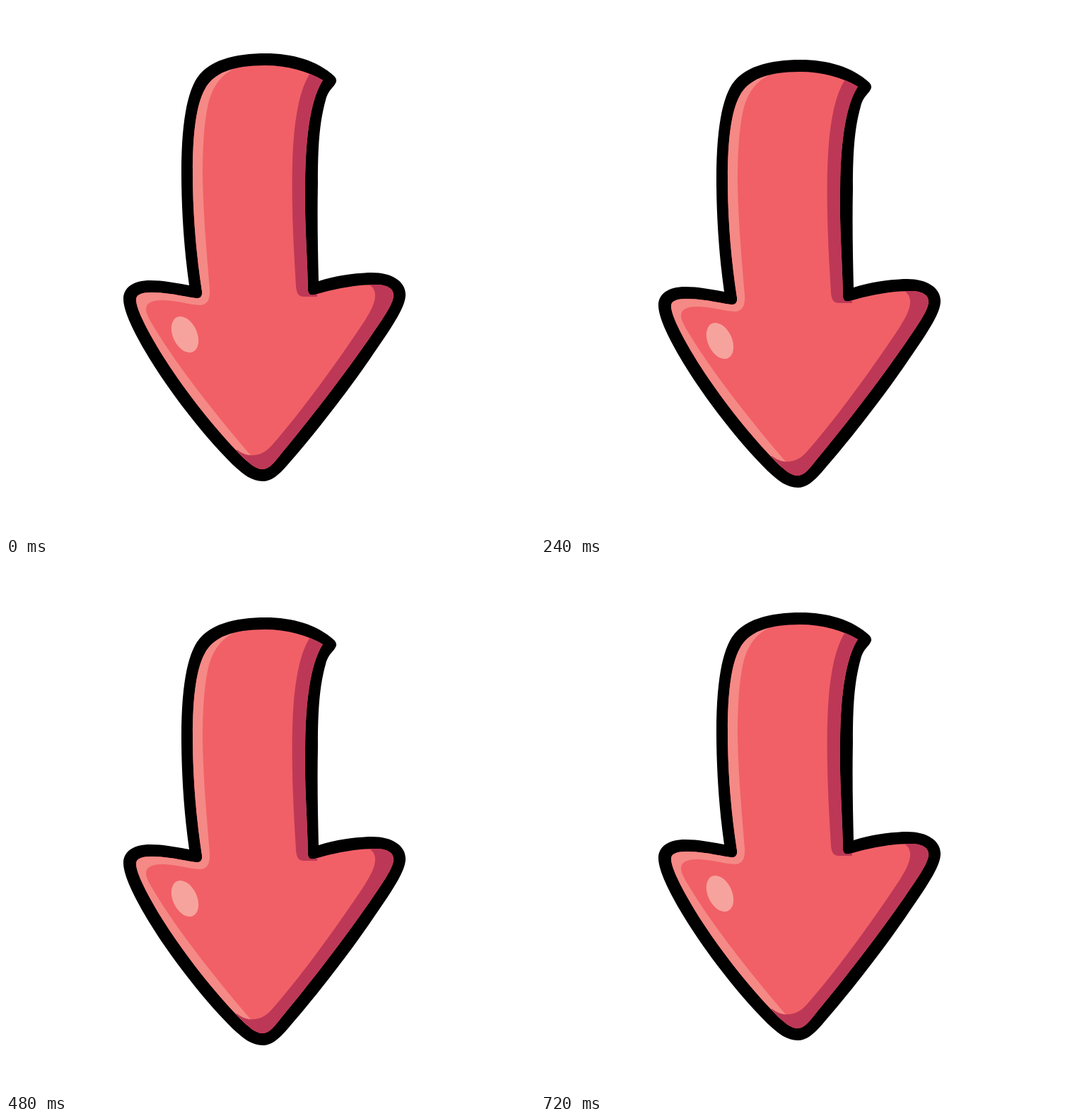
An HTML page that plays this animation: 748x748 px, repeating every 800 ms.

```html
<!DOCTYPE html>
<html lang="en">
<head>
<meta charset="utf-8">
<title>Bouncing arrow</title>
<style>
html, body { margin: 0; width: 100%; height: 100%; overflow: hidden; background: #fff; }
svg { display: block; width: 100vw; height: 100vh; }
</style>
</head>
<body>
<svg viewBox="0 0 748 748">
  <defs>
    <clipPath id="face">
      <path d="M366 84C398 84 426 92 448 105C433 128 423 175 423 258C422 305 426 350 427 401C427 407 430 410 437 408
        C465 400 495 394 522 394C540 394 548 400 548 409C548 418 540 431 528 449C490 506 435 578 390 632
        C380 645 372 655 363 655C353 655 344 647 331 634C285 587 235 520 207 470C192 443 184 425 184 415
        C184 408 192 405 206 405C228 405 248 410 268 413C275 414 278 410 277 403C269 350 264 295 264 235
        C264 180 269 140 281 118C293 95 320 84 366 84Z"/>
    </clipPath>
  </defs>
  <g id="arrow">
    <path d="M367 67C405 67 440 77 464 99Q469 104 466 109C462 117 456 118 452 133C443 165 441 200 441 250
      C440 300 441 345 442 389C470 380 500 377 518 377C545 377 565 389 565 408C565 424 550 448 520 491
      C485 543 435 607 398 649C385 664 375 672 363 672C348 672 336 663 320 648C275 603 225 537 196 487
      C178 456 166 430 166 414C166 398 180 388 204 388C224 388 242 392 259 395C252 345 248 290 248 235
      C248 175 254 132 267 107C283 76 325 67 367 67Z"/>
    <g clip-path="url(#face)">
      <path fill="#f16067" d="M160 60H570V680H160Z"/>
      <path fill="#f58985" d="M334 84C308 92 293 110 286 138C280 165 278 200 278 240C279 300 284 350 288 400
        C289 416 284 423 274 423C256 422 240 416 220 416C205 416 198 421 198 429C198 437 207 450 216 465
        C250 519 300 582 350 640L330 650L160 430V390H250V70H334Z"/>
      <path fill="#bd3856" d="M432 92C418 112 411 142 407 185C404 220 404 270 406 320C407 350 409 375 410 397
        C411 408 415 411 421 411L440 411V90Z"/>
      <path fill="#bd3856" d="M440 90H460V250H440Z"/>
      <path fill="#bd3856" d="M326 627C335 634 343 636 351 635C361 634 368 630 377 620C420 571 470 501 506 447
        C516 431 522 420 522 409C522 402 519 397 511 392H570V680H326Z"/>
    </g>
    <ellipse cx="253" cy="464.5" rx="17" ry="27" transform="rotate(-25 253 464.5)" fill="#f7a39d"/>
  </g>
</svg>
<script>
const LOOP = 800, STEP = 80, DROP = 11;
const arrow = document.getElementById("arrow");

// The drop follows half a sine wave, held for each step
function draw(now) {
  const t = Math.floor((now % LOOP) / STEP) * STEP;
  const y = Math.round(DROP * Math.sin(Math.PI * t / LOOP));
  arrow.setAttribute("transform", `translate(0 ${y})`);
}

let start;
function tick(now) {
  start ??= now;
  draw(now - start);
  requestAnimationFrame(tick);
}
draw(0);
requestAnimationFrame(tick);
</script>
</body>
</html>
```
